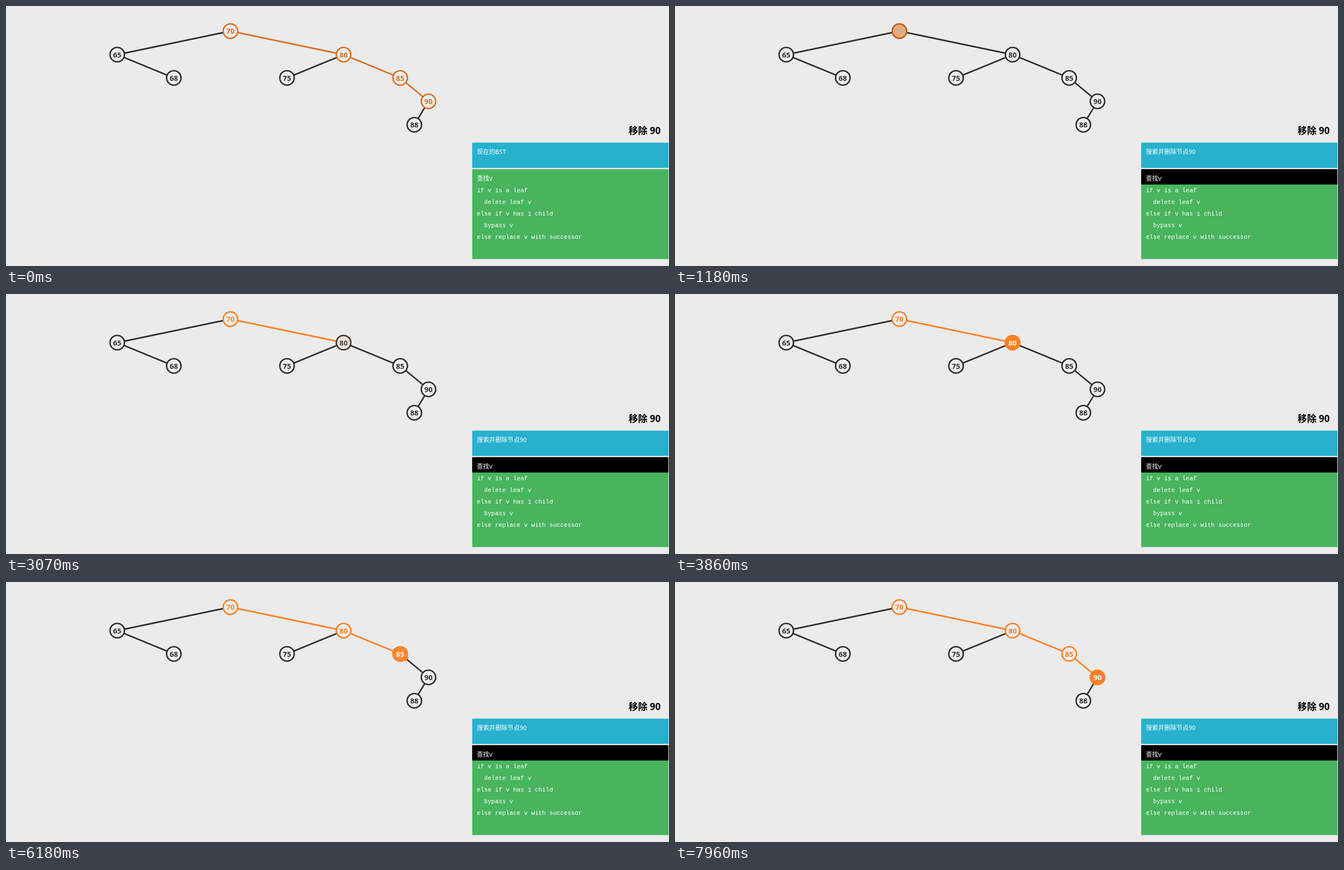
Recreate the animation shown at these times as an HTML page with a canvas. Size 1195 by 469 pixels, loop 8 s.

```html
<!DOCTYPE html>
<html lang="zh-CN">
<head>
<meta charset="utf-8">
<style>
  html, body { margin: 0; width: 100%; height: 100%; overflow: hidden; background: #ebebeb; }
  canvas { display: block; }
</style>
</head>
<body>
<canvas id="stage" width="1195" height="469"></canvas>
<script>
const ctx = document.getElementById('stage').getContext('2d');
const LOOP = 8000, FIRST = -269, STEP = 1041, FADE = 750;
const DARK = [45, 45, 45], ORANGE = [252, 127, 36], PALE = [237, 237, 237], WHITE = [255, 255, 255];
const SANS = '"Noto Sans", "Noto Sans CJK SC", "Noto Sans CJK", sans-serif';
const MONO = '"Liberation Mono", "Noto Sans CJK SC", "Noto Sans CJK", monospace';

const nodes = {
  70: [404.5, 45.3], 65: [200.5, 87.7], 80: [608.5, 87.7], 68: [302.5, 129.7],
  75: [506.5, 129.7], 85: [710.5, 129.7], 90: [761.5, 172], 88: [736, 214.2]
};
const edges = [[70, 65], [65, 68], [80, 75], [90, 88], [70, 80], [80, 85], [85, 90]];
const path = [70, 80, 85, 90];
const code = ['if v is a leaf', '  delete leaf v', 'else if v has 1 child',
  '  bypass v', 'else replace v with successor'];

// looks: [stroke, fill, text]
const plain = [DARK, PALE, DARK];
const active = [ORANGE, ORANGE, WHITE];
const visited = [ORANGE, PALE, ORANGE];

const clamp = x => Math.min(1, Math.max(0, x));
const ease = x => x < .5 ? 4 * x ** 3 : 1 - 4 * (1 - x) ** 3;
const start = step => FIRST + step * STEP;
const progress = (t, step) => ease(clamp((t - start(step)) / FADE));
const mix = (a, b, k) => a.map((v, i) => v + (b[i] - v) * k);
const mixLook = (a, b, k) => a.map((c, i) => mix(c, b[i], k));
const css = c => `rgb(${c.map(Math.round)})`;

function line(a, b, from, to, color, width) {
  const [x, y] = nodes[a], [u, v] = nodes[b];
  const inset = 13 / Math.hypot(u - x, v - y);
  const at = k => {
    const f = inset + (1 - 2 * inset) * k;
    return [x + (u - x) * f, y + (v - y) * f];
  };
  ctx.strokeStyle = css(color);
  ctx.lineWidth = width;
  ctx.beginPath();
  ctx.moveTo(...at(from));
  ctx.lineTo(...at(to));
  ctx.stroke();
}

function drawEdge([a, b], t) {
  const i = path.indexOf(a);
  if (i < 0 || path[i + 1] !== b) return line(a, b, 0, 1, DARK, 2.7);
  const step = 2 + 2 * i;
  if (t < start(step)) return line(a, b, 0, 1, mix(ORANGE, DARK, progress(t, 0)), 2.7);
  const grown = progress(t, step);
  const thin = clamp((t - start(step) - FADE - 10) / 80);
  if (grown < 1) line(a, b, 0, 1, DARK, 2.7);
  line(a, b, 0, grown, ORANGE, 9 - 6.3 * thin);
}

function lookOf(id, t) {
  const i = path.indexOf(id);
  if (i < 0) return plain;
  const on = 1 + 2 * i;
  if (t < start(on)) return mixLook(visited, plain, progress(t, 0));
  if (t < start(on + 1)) return mixLook(plain, active, progress(t, on));
  return mixLook(active, visited, progress(t, on + 1));
}

function drawNode(id, t) {
  const [x, y] = nodes[id], [stroke, fill, ink] = lookOf(id, t);
  ctx.beginPath();
  ctx.arc(x, y, 13, 0, 7);
  ctx.fillStyle = css(fill);
  ctx.fill();
  ctx.strokeStyle = css(stroke);
  ctx.lineWidth = 2.6;
  ctx.stroke();
  text(id, x, y + 4.8, `bold 13px ${SANS}`, css(ink), 'center');
}

function text(s, x, y, font, color = '#fff', align = 'left') {
  ctx.font = font;
  ctx.fillStyle = color;
  ctx.textAlign = align;
  ctx.fillText(s, x, y);
}

function box(y, h, color) {
  ctx.fillStyle = color;
  ctx.fillRect(840.3, y, 353.7, h);
}

function drawPanel(searching) {
  text('移除 90', 1180, 231, `bold 17px ${SANS}`, '#000', 'right');
  box(246.5, 45.5, '#27b1cd');
  box(294.4, 162.1, '#48b45e');
  if (searching) box(294.4, 27.6, '#000');
  text(searching ? '搜索并删除节点90' : '现在的BST', 848.7, 267, `500 11px ${SANS}`);
  text('查找', 848.7, 315, `500 11px ${SANS}`);
  text('V', 870.5, 315, `10.9px ${MONO}`);
  code.forEach((s, i) => text(s, 848.7, 336 + i * 21.1, `10.9px ${MONO}`));
}

function frame(now) {
  const t = now % LOOP;
  ctx.fillStyle = '#ebebeb';
  ctx.fillRect(0, 0, 1195, 469);
  edges.forEach(e => drawEdge(e, t));
  Object.keys(nodes).forEach(id => drawNode(+id, t));
  drawPanel(t >= start(1));
  requestAnimationFrame(frame);
}
requestAnimationFrame(frame);
</script>
</body>
</html>
```
